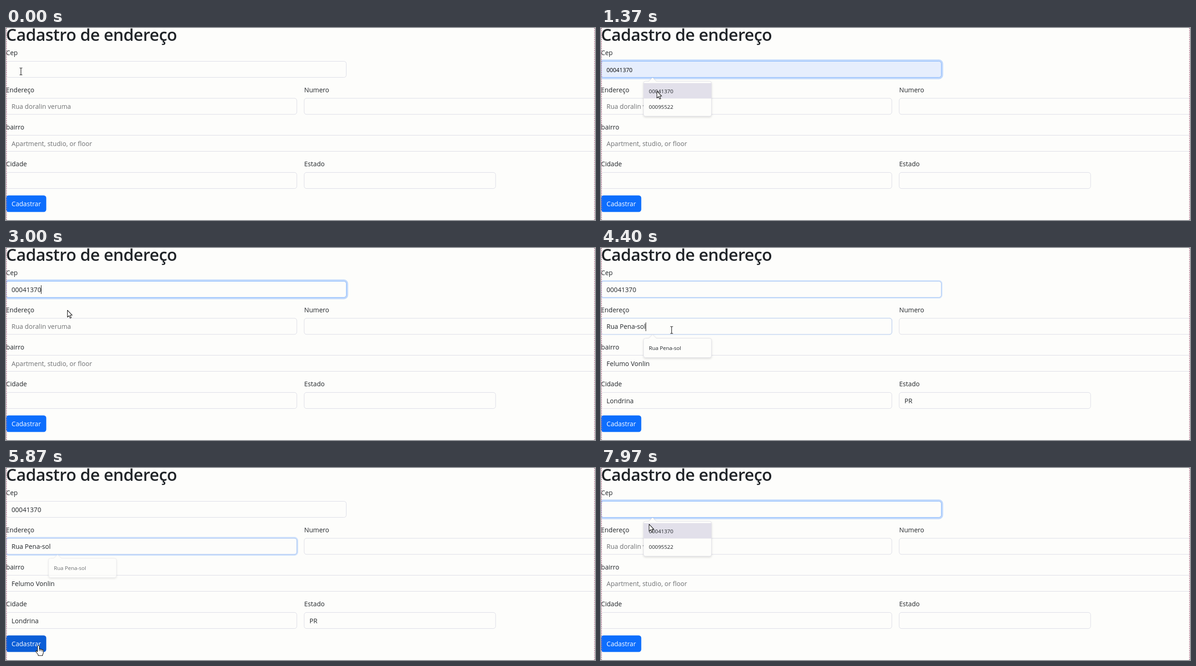
Write an HTML page that moves like this. It is 1280 px wide and 418 px high and loops after 8 s.

```html
<!DOCTYPE html>
<html lang="pt">
<head>
<meta charset="utf-8">
<title>Cadastro de endereço</title>
<style>
  html, body { margin: 0; width: 100%; height: 100%; overflow: hidden; background: #fdfdfb; }
  svg { display: block; width: 1280px; height: 418px; }
  text { font: 14.1px "Open Sans", "Noto Sans", sans-serif; fill: #212529; white-space: pre; }
  .title { font-size: 36.2px; font-weight: 600; letter-spacing: -.5px; }
  .hint { fill: #6f7173; }
  .option { font-size: 11.6px; }
  .preview { font-size: 12.3px; fill: #000; }
  .box { fill: #fdfdfb; stroke: #dadbe5; }
  .ring { fill: none; stroke: #0d6efd; }
  .edge { fill: none; stroke: #86b7fe; }
  .popup { fill: #fdfdfb; stroke: #e2e2e8; filter: drop-shadow(0 2px 2px #0002); }
</style>
</head>
<body>
<svg id="stage" viewBox="0 0 1280 418"></svg>
<script>
const LOOP = 8000;
const CODES = ["00041370", "00095522"];
const STREET = "Rua Pena-sol";

// moments of the interaction, in ms
const FOCUS_CEP = 400, PICK = 2750, FOCUS_STREET = 4340, FILL = 4370;
const PRESS = 5820, RESET = 6150, REFOCUS = 7220;

// pointer stops: time, x, y
const PATH = [
  [0, 32, 94], [900, 32, 94], [1400, 122, 137], [1650, 126, 140],
  [1950, 134, 157], [2350, 134, 157], [2650, 133, 135], [3650, 133, 135],
  [4200, 153, 178], [4900, 153, 178], [5600, 70, 386], [6350, 70, 386],
  [7050, 62, 95], [7600, 62, 95], [7960, 104, 122], [LOOP, 104, 122]
];

const CURSORS = {
  beam: "M-3 -7.5H-1Q0 -7.5 0 -6.5V6.5Q0 7.5 -1 7.5H-3M3 -7.5H1Q0 -7.5 0 -6.5M0 6.5Q0 7.5 1 7.5H3",
  arrow: "M0 0V15L3.5 11.8L5.8 17.3L8.3 16.3L6 10.8H10.5Z",
  hand: "M-2 2a2 2 0 0 1 4 0V8a1.8 1.8 0 0 1 3 .6a1.8 1.8 0 0 1 3 .8a1.6 1.6 0 0 1 2.6 1.2V16" +
        "Q10.4 18 9 20V22H-.5V20L-5.5 13.5Q-6 11 -4 11.5L-2 13.5ZM2 8V12M5 9V12M8 10V13"
};

const stage = document.getElementById("stage");

function add(tag, attrs, parent = stage) {
  const el = document.createElementNS("http://www.w3.org/2000/svg", tag);
  for (const key in attrs) el.setAttribute(key, attrs[key]);
  return parent.appendChild(el);
}

function write(x, y, content, cls = "", parent = stage) {
  const el = add("text", { x, y, class: cls }, parent);
  el.textContent = content;
  return el;
}

function field(x, y, w, hint = "") {
  const shape = { x: x + .5, y: y + .5, width: w - 1, height: 35, rx: 5 };
  const ring = add("rect", { ...shape, class: "ring" });
  const box = add("rect", { ...shape, class: "box" });
  const edge = add("rect", { ...shape, class: "edge" });
  const label = write(x + 12, y + 23.5, hint, "hint");
  const inside = (px, py) => px >= x && px <= x + w && py >= y && py <= y + 36;

  function show(value, cls = "") {
    label.textContent = value || hint;
    label.setAttribute("class", value ? cls : "hint");
  }
  function glow(k) {
    ring.setAttribute("stroke-width", 8 * k);
    ring.setAttribute("opacity", .25 * k);
    edge.setAttribute("opacity", k);
  }
  glow(0);
  return { x, y, box, label, inside, show, glow };
}

function popup(top, items) {
  const group = add("g", {});
  const bottom = top + 8 + 34 * items.length;
  add("path", {
    class: "popup",
    d: `M96.5 ${top}H104L112 ${top - 8}L120 ${top}H236a4 4 0 0 1 4 4V${bottom - 4}a4 4 0 0 1 -4 4H96.5a4 4 0 0 1 -4 -4V${top + 4}a4 4 0 0 1 4 -4Z`
  }, group);
  const rows = items.map((item, i) => {
    const row = add("rect", { x: 93, y: top + 4 + 34 * i, width: 147, height: 33.5, fill: "#e2e0ea" }, group);
    write(104, top + 25.5 + 34 * i, item, "option", group);
    return row;
  });
  return { group, rows };
}

write(0, 28, "Cadastro de endereço", "title");
write(0, 59, "Cep");
write(0, 140, "Endereço");
write(648, 140, "Numero");
write(0, 220.5, "bairro");
write(0, 301, "Cidade");
write(648, 301, "Estado");

const cep = field(0, 72, 740);
const street = field(0, 152.5, 632.5, "Rua doralin veruma");
const number = field(647.5, 152.5, 640);
const district = field(-6, 233, 1294, "Apartment, studio, or floor");
district.label.setAttribute("x", 12);
const city = field(0, 314, 632.5);
const state = field(647.5, 314, 417);
const fields = [cep, street, number, district, city, state];

const button = add("rect", { x: 0, y: 364.5, width: 87.5, height: 36, rx: 5.5 });
write(12, 388, "Cadastrar").style.fill = "#fff";

for (const x of [1, 1279])
  add("path", { d: `M${x} 0V418`, stroke: "#b98299", "stroke-width": 2, "stroke-dasharray": "2 2" });

const caret = add("rect", { width: 1, height: 19, fill: "#111" });
const codeList = popup(116, CODES);
const streetList = popup(196.5, [STREET]);
const halo = add("path", { fill: "none", stroke: "#fff", "stroke-width": 2 });
const cursor = add("path", { "stroke-width": 1.1, "stroke-linejoin": "round" });

const clamp = v => Math.min(1, Math.max(0, v));
const smooth = u => u * u * (3 - 2 * u);
const between = (t, a, b) => t >= a && t < b;
// rises at a and falls at b over the given duration
const fade = (t, a, b, ms = 150) => smooth(clamp((t - a) / ms)) - smooth(clamp((t - b) / ms));

function pointer(t) {
  const i = Math.max(1, PATH.findIndex(stop => stop[0] >= t));
  const [t0, x0, y0] = PATH[i - 1], [t1, x1, y1] = PATH[i];
  const u = smooth(clamp((t - t0) / (t1 - t0)));
  return [x0 + (x1 - x0) * u, y0 + (y1 - y0) * u];
}

const codesOpen = t => between(t, FOCUS_CEP + 60, PICK) || t >= REFOCUS + 60;
const streetOpen = t => between(t, FOCUS_STREET + 30, PRESS);

function hovered(t, open, top, count) {
  const [x, y] = pointer(t);
  const row = Math.floor((y - top - 4) / 34);
  return open(t) && between(x, 92, 240) && row >= 0 && row < count ? row : -1;
}

function placeCaret(t) {
  const inStreet = between(t, FOCUS_STREET, PRESS);
  const since = inStreet ? FOCUS_STREET
    : t >= REFOCUS ? REFOCUS
    : between(t, PICK, FOCUS_STREET) ? PICK
    : between(t, FOCUS_CEP, PICK) ? FOCUS_CEP : null;
  const target = inStreet ? street : cep;
  const on = since !== null && (t - since) % 1000 < 500 && target.label.getAttribute("class") !== "preview";
  caret.setAttribute("opacity", on ? 1 : 0);
  const filled = target.label.getAttribute("class") !== "hint";
  caret.setAttribute("x", 12 + (filled ? Math.round(target.label.getComputedTextLength()) : 0));
  caret.setAttribute("y", Math.round(target.y) + 9);
}

function placeCursor(t, overList) {
  const [x, y] = pointer(t);
  const overButton = x < 87 && between(y, 365, 401);
  const kind = overButton ? "hand"
    : !overList && fields.some(f => f.inside(x, y)) ? "beam" : "arrow";
  // half a pixel keeps the thin strokes crisp
  const place = `translate(${Math.round(x) + .5} ${Math.round(y) + .5})`;
  for (const el of [halo, cursor]) {
    el.setAttribute("d", CURSORS[kind]);
    el.setAttribute("transform", place);
  }
  halo.setAttribute("opacity", kind === "beam" ? .8 : 0);
  cursor.setAttribute("stroke", "#111");
  cursor.setAttribute("fill", kind === "beam" ? "none" : "#fff");
  button.setAttribute("fill", !overButton ? "#0d6efd"
    : between(t, PRESS + 80, PRESS + 180) ? "#0a58ca" : "#0b5ed7");
}

function draw(t) {
  const row = hovered(t, codesOpen, 116, 2);
  // the suggested value follows the hover a little later
  const hint = row < 0 ? -1 : hovered(t - 100, codesOpen, 116, 2);
  const filled = between(t, FILL, RESET);

  cep.show(hint >= 0 ? CODES[hint] : between(t, PICK, RESET) ? CODES[0] : "", hint >= 0 ? "preview" : "");
  cep.box.style.fill = hint >= 0 ? "#e6eefd" : "";
  street.show(filled ? STREET : "");
  district.show(filled ? "Felumo Vonlin" : "");
  city.show(filled ? "Londrina" : "");
  state.show(filled ? "PR" : "");

  cep.glow(fade(t, FOCUS_CEP, FOCUS_STREET) + fade(t, REFOCUS, 2 * LOOP));
  street.glow(fade(t, FOCUS_STREET, PRESS));

  const codesShown = codesOpen(t) ? 1 : t < PICK ? 0 : 1 - clamp((t - PICK) / 150);
  const streetShown = streetOpen(t) ? 1 : t < PRESS ? 0 : 1 - clamp((t - PRESS) / 150);
  codeList.group.setAttribute("opacity", codesShown);
  streetList.group.setAttribute("opacity", streetShown);
  codeList.rows.forEach((el, i) => el.setAttribute("opacity", i === row ? 1 : 0));
  const streetRow = hovered(t, streetOpen, 196.5, 1);
  streetList.rows[0].setAttribute("opacity", streetRow === 0 ? 1 : 0);

  placeCaret(t);
  placeCursor(t, row >= 0 || streetRow >= 0);
}

const start = performance.now();
function tick(now) {
  draw(Math.max(0, now - start) % LOOP);
  requestAnimationFrame(tick);
}
draw(0);
requestAnimationFrame(tick);
</script>
</body>
</html>
```
